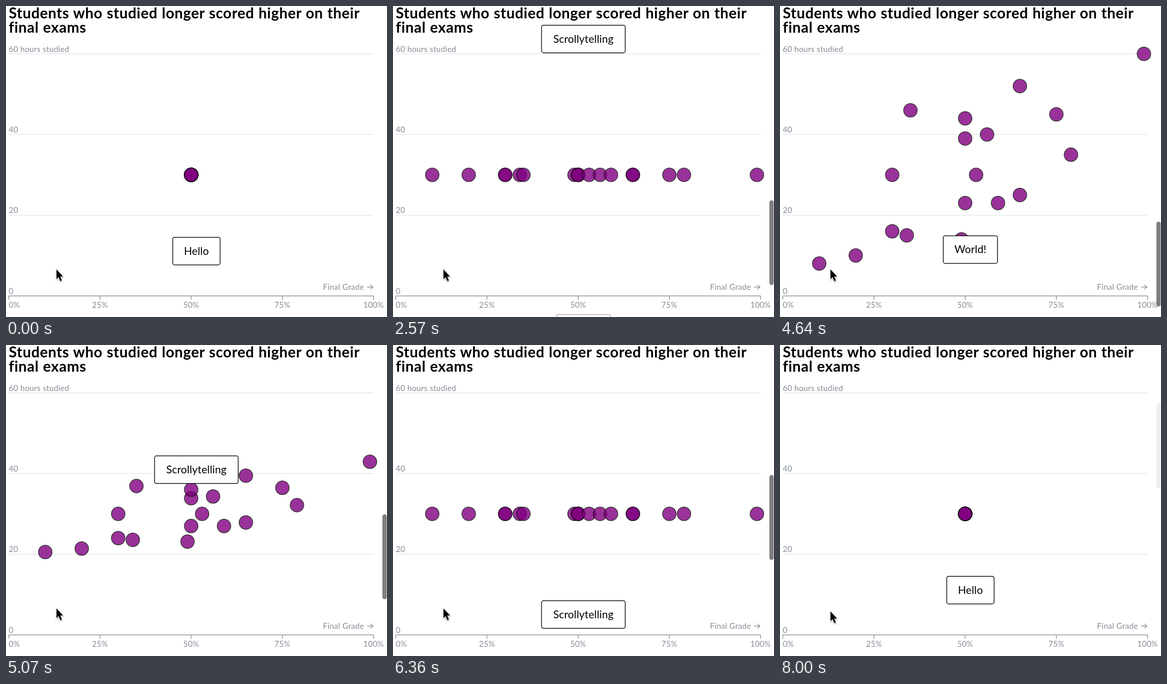
Recreate the animation shown at these times as an HTML page. Size 829 px wide and 676 px high, loop 8.11 s.

```html
<!DOCTYPE html>
<html lang="en">
<head>
<meta charset="utf-8">
<title>Study hours and final grades</title>
<style>
  html, body { margin: 0; width: 100%; height: 100%; overflow: hidden; background: #fff; }
  svg { display: block; width: 829px; height: 676px; font-family: Lato, sans-serif; }
  .title { font-size: 32px; font-weight: 700; letter-spacing: .7px; word-spacing: .7px; }
  .label { font-size: 17.2px; fill: #868d96; letter-spacing: .25px; word-spacing: .2px; }
  .grid { stroke: #e3e5e8; stroke-width: 1.5; }
  .axis { stroke: #868d96; stroke-width: 1.5; fill: none; }
  .dot { fill: purple; stroke: #000; stroke-width: 1.5; opacity: .8; }
  .step rect { fill: #fff; stroke: currentColor; stroke-width: 1.5; }
  .step text { fill: currentColor; font-size: 23px; letter-spacing: .2px; text-anchor: middle; }
  #cursor { filter: drop-shadow(0 2px 1.5px rgba(0, 0, 0, .35)); }
</style>
</head>
<body>
<svg id="stage" viewBox="0 0 829 676">
  <text class="title" x="6" y="26.5">Students who studied longer scored higher on their</text>
  <text class="title" x="6" y="58.3">final exams</text>
  <g id="chart"></g>
  <g id="dots"></g>
  <g id="steps"></g>
  <rect id="bar" x="819" width="9.3" height="184.5" rx="4.6" fill="#7f7f7f"/>
  <path id="cursor" d="M0 0V21L4.6 16.8L8.4 25.4L11.9 24L8.2 15.6H14.4Z" stroke="#fff" stroke-width="1.5" paint-order="stroke"/>
</svg>
<script>
const LOOP = 8110, LAST = 8000;
const $ = id => document.getElementById(id);
const clamp = v => Math.min(1, Math.max(0, v));

function add(parent, tag, attrs, text) {
  const el = document.createElementNS('http://www.w3.org/2000/svg', tag);
  for (const k in attrs) el.setAttribute(k, attrs[k]);
  if (text) el.textContent = text;
  return parent.appendChild(el);
}

const px = grade => 6 + grade * 7.938;
const py = hours => 630 - hours * 8.767;

// Axes
const chart = $('chart');
for (const h of [60, 40, 20, 0]) {
  if (h) add(chart, 'path', { class: 'grid', d: `M6 ${py(h)}H800` });
  add(chart, 'text', { class: 'label', x: 6, y: py(h) - 4.3 }, h === 60 ? '60 hours studied' : String(h));
}
add(chart, 'path', { class: 'axis', d: 'M6 630.3H800' });
for (const g of [0, 25, 50, 75, 100]) {
  add(chart, 'path', { class: 'axis', d: `M${px(g)} 630V638.5` });
  add(chart, 'text', { class: 'label', x: px(g), y: 656, 'text-anchor': g ? 'middle' : 'start' }, g + '%');
}
add(chart, 'text', { class: 'label', x: 779, y: 617, 'text-anchor': 'end' }, 'Final Grade');
add(chart, 'path', { class: 'axis', d: 'M785.5 611H798M793 606L798.3 611L793 616' });

// [grade, hours]
const data = [
  [10, 8], [20, 10], [30, 16], [30, 30], [34, 15], [35, 46], [49, 14], [50, 23], [50, 39],
  [50, 44], [53, 30], [56, 40], [59, 23], [65, 25], [65, 52], [75, 45], [79, 35], [99, 60]
];
const dots = data.map(() => add($('dots'), 'circle', { class: 'dot', r: 14.8 }));

const steps = [['Hello', 103], ['Scrollytelling', 182], ['World!', 118]].map(([word, w]) => {
  const g = add($('steps'), 'g', { class: 'step' });
  add(g, 'rect', { x: -w / 2, y: .7, width: w, height: 60, rx: 4 });
  add(g, 'text', { x: 0, y: 38.6 }, word);
  return g;
});

// Flick scrolling: quick push, then exponential decay
const flicks = [
  { at: 5, len: 990, decay: 98, by: 649 },
  { at: 2140, len: 1070, decay: 116.5, by: 614 },
  { at: 4600, len: 1290, decay: 146, by: -591 },
  { at: 6209, len: 1220, decay: 117, by: -672 }
];
const push = x => 1 - (1 + x + x * x / 2) * Math.exp(-x);
const scrollAt = t => flicks.reduce((sum, f) =>
  sum + f.by * push(clamp((t - f.at) / f.len) * f.len / f.decay) / push(f.len / f.decay), 0);

// Progress of the two chart states: grades spread out, hours rise
const tween = (t, at, len) => 1 - (1 - clamp((t - at) / len)) ** 3;
const spreadAt = (t, len) => tween(t, 361, len) - tween(t, 6475, len);
const riseAt = (t, len) => tween(t, 2690, len) - tween(t, 4924, len);

// [shown from, fading from]
const barSpans = [[40, 1400], [2175, 3760], [4635, 7860]];
function barAlpha(t) {
  const span = barSpans.find(([a, b]) => t >= a && t < b + 160);
  return span ? 1 - clamp((t - span[1]) / 160) : 0;
}

function draw(time) {
  const t = Math.min(time % LOOP, LAST);
  const scroll = scrollAt(t);

  const spread = spreadAt(t, 600), rise = riseAt(t, 600);
  data.forEach(([g, h], i) => {
    dots[i].setAttribute('cx', px(50 + (g - 50) * spread));
    dots[i].setAttribute('cy', py(30 + (h - 30) * rise));
  });

  const second = spreadAt(t, 120), third = riseAt(t, 120);
  const active = [1 - second, second - third, third];
  steps.forEach((el, i) => {
    const c = Math.round(170 * (1 - clamp(active[i])));
    el.setAttribute('transform', `translate(414.3 ${502 + 629 * i - scroll})`);
    el.style.color = `rgb(${c},${c},${c})`;
  });

  $('bar').setAttribute('y', 126 + scroll / 3.68);
  $('bar').setAttribute('opacity', barAlpha(t));

  const nudge = clamp((t - 7090) / 320);
  $('cursor').setAttribute('transform', `translate(109.8 ${572.5 + 6.5 * nudge * nudge * (3 - 2 * nudge)})`);
}

const start = performance.now();
function frame() {
  draw(performance.now() - start);
  requestAnimationFrame(frame);
}
frame();
</script>
</body>
</html>
```
